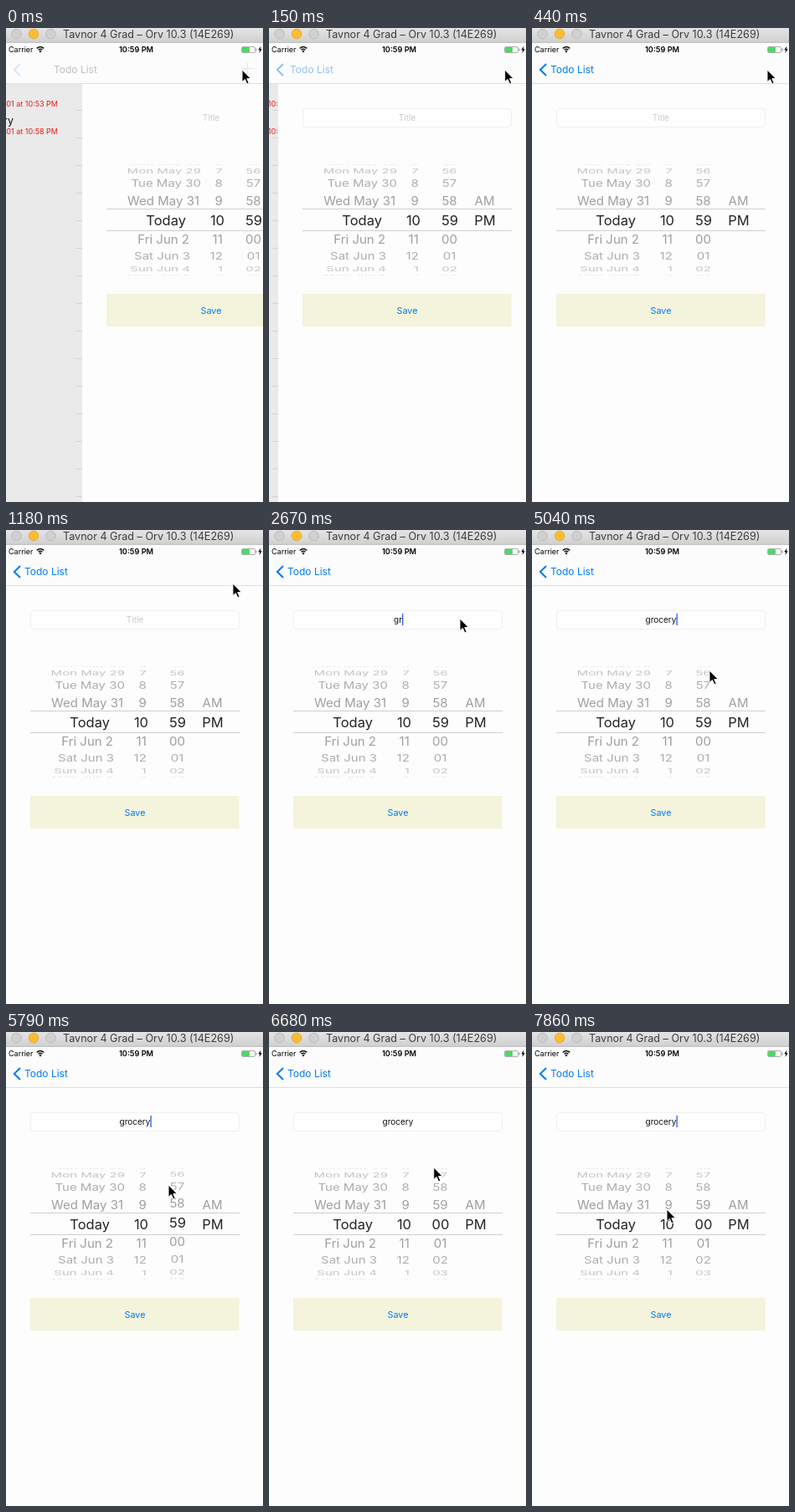
Animation of 307 by 567 pixels, one loop 8 s. Source, as an HTML page:

```html
<!DOCTYPE html>
<html lang="en">
<head>
<meta charset="utf-8">
<title>Todo picker</title>
<style>
html, body { margin: 0; width: 100%; height: 100%; overflow: hidden; background: #fdfdfd; }
svg { display: block; width: 307px; height: 567px; font-family: Inter, "Liberation Sans", sans-serif; }
.mid { text-anchor: middle; }
.end { text-anchor: end; }
.blue { fill: #007af5; }
.near { font-size: 16.5px; fill: #242424; }
.far { font-size: 15px; fill: #999; }
</style>
</head>
<body>
<svg id="stage" viewBox="0 0 307 567">
  <defs>
    <linearGradient id="chrome" x2="0" y2="1">
      <stop stop-color="#e4e4e4"/><stop offset="1" stop-color="#d0d0d0"/>
    </linearGradient>
    <clipPath id="lens"><rect x="20" y="217" width="270" height="25"/></clipPath>
    <clipPath id="rim"><path d="M20 163H290V216H20ZM20 243H290V296H20Z"/></clipPath>
  </defs>
  <rect width="307" height="567" fill="#fdfdfd"/>

  <g id="list">
    <rect y="67" width="307" height="500" fill="#eaeaea"/>
    <g id="items" class="end" font-size="9" fill="#f01414">
      <text x="62" y="94">2017-06-01 at 10:53 PM</text>
      <text x="9" y="115" font-size="12.5" fill="#111">grocery</text>
      <text x="62" y="127">2017-06-01 at 10:58 PM</text>
    </g>
    <path id="separators" stroke="#d2d2d2"/>
  </g>

  <g id="page">
    <rect y="67" width="307" height="500" fill="#fdfdfd"/>
    <rect id="field" x="29.5" y="96.5" width="249" height="22" rx="3.5" fill="#fefefe" stroke="#f0f0f0"/>
    <text id="entry" class="mid" x="154" y="110.5" font-size="10"></text>
    <rect id="caret" y="100" width="1.4" height="14" fill="#3b66e4"/>
    <g id="rimRows" class="far" clip-path="url(#rim)"></g>
    <g id="lensRows" class="near" clip-path="url(#lens)"></g>
    <path d="M29 216.5H279M29 242.5H279" stroke="#cfcfcf"/>
    <rect x="29" y="318" width="249.6" height="39" fill="#f4f3db"/>
    <text class="mid blue" x="154" y="341.5" font-size="10.8">Save</text>
  </g>

  <rect y="17" width="307" height="49" fill="#fcfcfc"/>
  <path d="M0 66.5H307" stroke="#dedede"/>
  <path id="chevron" d="M17 43L9.8 50L17 57" fill="none" stroke="#007af5" stroke-width="2"/>
  <g font-size="12">
    <text id="oldTitle" y="54" fill="#222">Todo List</text>
    <text id="backTitle" class="blue" y="54">Todo List</text>
  </g>
  <path id="plus" d="M281 48.5H296M288.5 41V56" stroke="#c9cce0" stroke-width="1.2"/>

  <text x="3" y="29" font-size="9">Carrier</text>
  <g fill="none" stroke="#111" stroke-width="1.5">
    <path d="M36.8 24.4Q41 20.6 45.2 24.4M38.6 26.3Q41 24.2 43.4 26.3"/>
    <circle cx="41" cy="28" r=".5"/>
  </g>
  <text class="mid" x="155.5" y="29" font-size="9.2" font-weight="600">10:59 PM</text>
  <rect x="281.5" y="22.5" width="16" height="7" rx="1.5" fill="#fff" stroke="#9a9a9a" stroke-width=".8"/>
  <rect x="282" y="23" width="9" height="6" rx="1" fill="#4cd964"/>
  <path d="M299 24.5V27.5" stroke="#888"/>
  <path d="M304.5 21.5L301.3 26.2H303.2L302.4 30L305.8 25.2H303.8Z"/>

  <rect width="307" height="17" fill="url(#chrome)"/>
  <path d="M0 17.3H307" stroke="#b9b9b9"/>
  <g fill="#d0d0d0" stroke="#b4b4b4" stroke-width=".8">
    <circle cx="12.5" cy="7" r="5.8"/>
    <circle cx="33" cy="7" r="5.8" fill="#fdbd2e" stroke="#e0a42a"/>
    <circle cx="53.5" cy="7" r="5.8"/>
  </g>
  <text x="68" y="12" font-size="12.6" fill="#3c3c3c">Tavnor 4 Grad – Orv 10.3 (14E269)</text>

  <path id="cursor" d="M0 0V14.5L3.4 11.4L5.9 17L8.2 16L5.8 10.6H10.4Z" stroke="#fff" stroke-width="1"/>
</svg>
<script>
const LOOP = 8000, STEP = 148.4;
const $ = id => document.getElementById(id);
const set = (el, attrs) => { for (const key in attrs) el.setAttribute(key, attrs[key]); };
const clamp = v => Math.max(0, Math.min(1, v));

// Linear interpolation through [time, ...values] keys
function track(keys, t) {
  const i = keys.findIndex(key => key[0] > t);
  if (i === 0) return keys[0].slice(1);
  if (i < 0) return keys[keys.length - 1].slice(1);
  const a = keys[i - 1], b = keys[i], p = (t - a[0]) / (b[0] - a[0]);
  return a.slice(1).map((v, n) => v + (b[n + 1] - v) * p);
}

const cursorKeys = [
  [0, 282, 50], [445, 281, 50], [742, 271, 64], [1187, 271, 64], [1335, 235, 115],
  [1484, 228, 109], [1781, 228, 106], [4452, 228, 106], [4750, 230, 122], [5045, 212, 168],
  [5342, 198, 186], [5640, 195, 185], [5788, 194, 183], [6233, 196, 170], [6530, 196.5, 162],
  [6826, 197, 162], [7123, 214, 260], [7271, 219, 330], [7420, 216, 355], [7568, 205, 330],
  [7716, 176, 250], [7865, 161, 212]
];
const wheelKeys = [[5490, 0], [5788, .085], [6233, .65], [6530, 1]];
const word = "grocery";
const keyTimes = [2380, 2670, 3110, 3560, 3710, 3860, 4150];

// Wheel rows: each has a near copy in the lens and a far copy on the rim
const RADIUS = 67.5, ANGLE = Math.PI / 9;
function addRow(index, label, x, anchor, nearX = x) {
  const make = (parent, left) => {
    const text = document.createElementNS("http://www.w3.org/2000/svg", "text");
    text.textContent = label;
    set(text, { class: anchor, dy: ".36em" });
    $(parent).append(text);
    return { text, x: left };
  };
  return { index, copies: [make("rimRows", x), make("lensRows", nearX)] };
}
function placeRow({ index, copies }, turn) {
  const angle = (index - turn) * ANGLE, depth = Math.cos(angle);
  const y = 229.7 + RADIUS * Math.sin(angle);
  for (const { text, x } of copies) set(text, {
    transform: `translate(${x} ${y}) scale(1 ${Math.max(depth, .01)})`,
    opacity: depth > 0 ? .15 + .85 * depth : 0
  });
}

const dates = ["Sun May 28", "Mon May 29", "Tue May 30", "Wed May 31", "Today",
  "Fri Jun 2", "Sat Jun 3", "Sun Jun 4", "Mon Jun 5"];
const dateEnds = [142, 142, 142, 140, 124, 128, 129, 129, 129];
const minutes = [];
for (let i = -4; i <= 5; i++) {
  if (i < 5) {
    placeRow(addRow(i, dates[i + 4], dateEnds[i + 4], "end"), 0);
    placeRow(addRow(i, (i + 9) % 12 + 1, 167.8, "end", 170), 0);
  }
  minutes.push(addRow(i, String((i + 59) % 60).padStart(2, "0"), 204.5, "mid", 205));
}
placeRow(addRow(-1, "AM", 246.5, "mid"), 0);
placeRow(addRow(0, "PM", 247, "mid"), 0);

function drawPush(t) {
  const shift = 91 * Math.exp(-t / 70.3);
  const titleX = 22 + 35 * Math.exp(-t / 61);
  set($("page"), { transform: `translate(${shift < .3 ? 0 : shift} 0)` });
  set($("list"), { visibility: shift < .3 ? "hidden" : "visible" });
  set($("items"), { transform: `translate(${(shift - 91) * .3} 0)` });
  let lines = "";
  for (let y = 98.5; y < 567; y += 33) lines += `M${shift - 7} ${y}h7`;
  set($("separators"), { d: lines });
  set($("field"), { opacity: clamp((60 - shift) / 40) });
  set($("chevron"), { opacity: clamp(.15 + t / 480) });
  set($("oldTitle"), { x: titleX, opacity: .28 * clamp(1 - t / 150) });
  set($("backTitle"), { x: titleX, opacity: clamp(t / 340) });
  set($("plus"), { opacity: .4 * clamp(1 - t / 200) });
}

function drawEntry(t) {
  const entry = $("entry");
  const typed = word.slice(0, keyTimes.filter(time => t >= time - 20).length);
  entry.textContent = typed || "Title";
  set(entry, { fill: typed ? "#111" : "#cacace" });
  const caretX = typed ? 154 + entry.getComputedTextLength() / 2 : 141.5;
  const blinkOn = t < 4590 || (t - 4750 + LOOP) % 1000 < 500;
  set($("caret"), { x: caretX, visibility: t > 2060 && blinkOn ? "visible" : "hidden" });
}

function draw(time) {
  // The screen refreshes in fixed steps
  const t = Math.floor((time % LOOP + 12) / STEP) * STEP;
  drawPush(t);
  drawEntry(t);
  const [turn] = track(wheelKeys, t);
  minutes.forEach(row => placeRow(row, turn));
  const [x, y] = track(cursorKeys, t);
  set($("cursor"), { transform: `translate(${x} ${y})` });
}

const start = performance.now();
function tick() {
  draw(performance.now() - start);
  requestAnimationFrame(tick);
}
tick();
</script>
</body>
</html>
```
